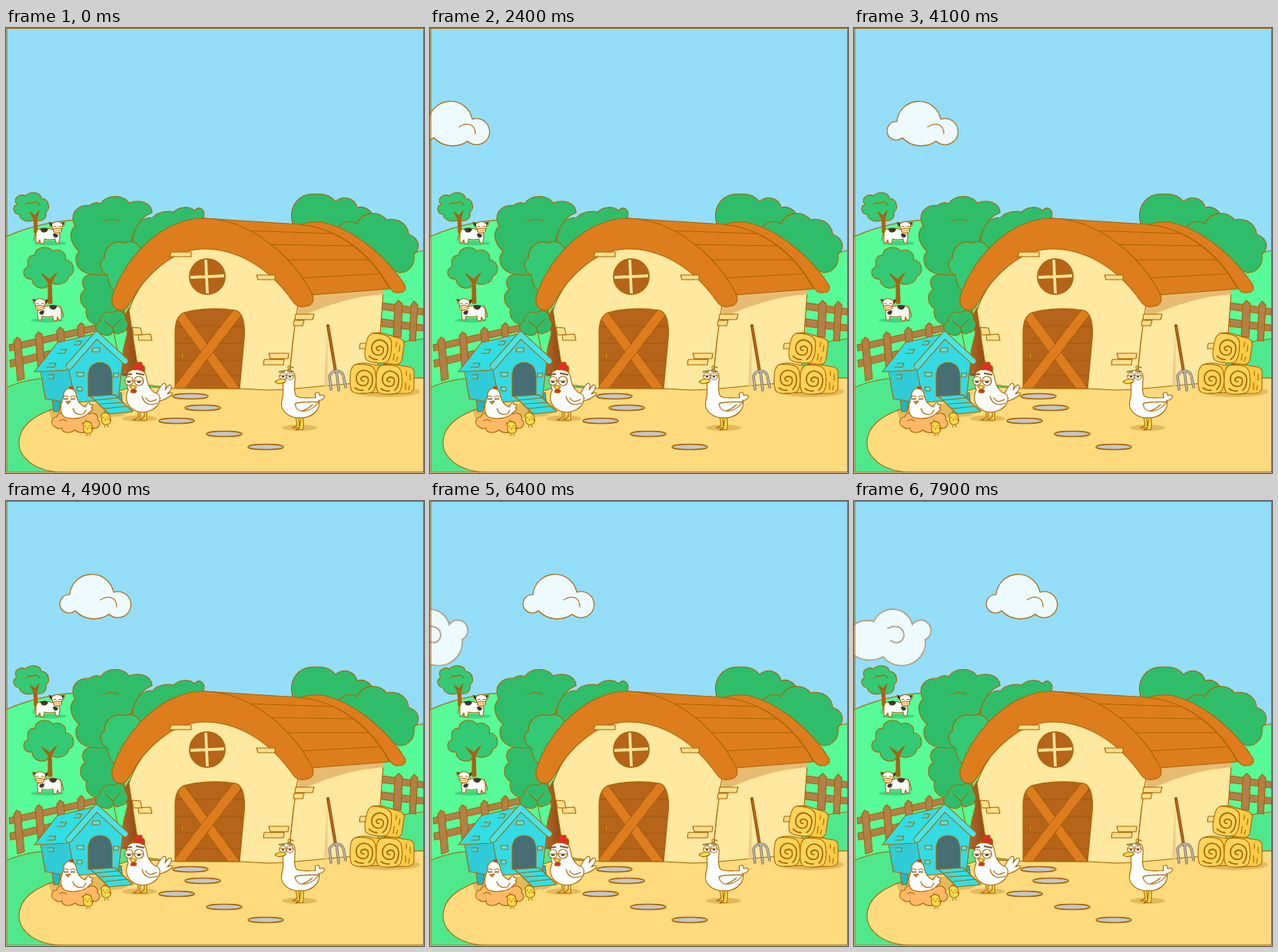
An HTML page without scripts for the animation above (8 s loop, 544 by 580 pixels).

```html
<!DOCTYPE html>
<html lang="en">
<head>
<meta charset="utf-8">
<title>Farm</title>
<style>
html, body { margin: 0; width: 100%; height: 100%; overflow: hidden; background: #94def9; }
svg { display: block; width: 100%; height: 100%; }
.line { stroke: #a86400; stroke-width: 1.1; stroke-linejoin: round; stroke-linecap: round; }
.none { fill: none; }
.leaf { fill: #30bd6a; }
.leaf2 { fill: #34c974; }
.trunk { fill: #a9601f; }
.fence { fill: #b28049; }
.roof { fill: #de7d1e; }
.wall { fill: #ffe8a0; }
.wood { fill: #b56419; }
.cyan { fill: #30dfe6; }
.white { fill: #fff; }
.gold { fill: #f9dd4c; }
.red { fill: #e42a22; }
.dark { fill: #40362c; }
.shade { fill: #965a00; opacity: .25; }
.drift { animation: drift 8s steps(80, end) infinite; }
@keyframes drift { from { transform: translateX(-268.6px); } to { transform: translateX(3.4px); } }
</style>
</head>
<body>
<svg viewBox="0 0 544 580" preserveAspectRatio="none">
<defs>
  <linearGradient id="bark" x1="0" y1="0" x2="1" y2="0">
    <stop offset="0" stop-color="#b8692a"/><stop offset="1" stop-color="#84420f"/>
  </linearGradient>
  <clipPath id="door"><path d="M220 469V400Q219 373 235 370Q266 363 299 368Q311 372 310.500 400L304 470Z"/></clipPath>

  <g id="cow">
    <ellipse class="shade" cx="58" cy="280.500" rx="21" ry="3" style="fill:#006030"/>
    <path class="line white" d="M41 263Q38 266 36 277M40 263Q50 259 62 263Q71 266 70 272L69 280H65L64 275Q57 277 50 275L49 281H45L44 276L42 280H39V268Z"/>
    <path class="dark" d="M44 262Q51 259 55 262Q53 268 47 266ZM61 268Q66 267 68 271Q65 275 62 272Z"/>
    <path class="line white" d="M60 255L56 253Q57 258 60 259L62 264Q67 268 72 264L73 259Q77 257 76 253L72 254Q66 250 60 255Z"/>
    <path class="dark" d="M60 255L56 253Q57 258 60 259ZM72 254L76 253L74 258Z"/>
    <ellipse class="line" cx="67" cy="264" rx="5.500" ry="3.200" fill="#ffd3a2"/>
    <path class="line none" d="M62 258.500H65M69 258.500H72M65 264H65.200M69 264H69.200"/>
  </g>

  <g id="bale" class="line">
    <path fill="#ffcb47" d="M7 2Q17-2 28 1L45 4Q51 6 50 13V31Q49 37 43 38L15 39Z"/>
    <path fill="#ffd45c" d="M7 2Q18 0 27 3Q34 6 34 15Q36 27 32 35Q28 40 17 39Q6 40 3 36Q0 30 1 17Q1 5 7 2Z"/>
    <path class="none" style="stroke-width:1.700" d="M19 23Q14 23 15 19Q20 15 24 19Q26 27 20 29Q11 30 9 22Q8 11 18 9Q30 10 30 21Q30 30 25 34M7 32Q12 36 18 35"/>
    <path class="none" d="M40 9V15M39 24V33M45 13V21M44 28L43 34"/>
  </g>

  <g id="chick">
    <path class="line gold" d="M101 520Q99 514 104 513Q110 512 111 517Q114 521 112 526Q109 530 104 528Q100 526 101 520Z"/>
    <path class="line none" d="M105 513L104 511M103 519H104M108 519H109M105 530V531.500M109 530V531.500M110 521L113 523"/>
    <path d="M104 521H108L106 524Z" fill="#f28b20"/>
  </g>
  <ellipse id="stone" class="line" rx="23" ry="3.600" fill="#c5c7ce" style="stroke-width:1.500"/>
</defs>

<path d="M0 0H544V580H0Z" fill="#94def9"/>

<g class="drift">
  <path class="line" fill="#edfaff" d="M185 122A28.800 28.800 0 0 1 242 119A17 17 0 1 1 236 147.500A34 34 0 0 1 192 143A12 12 0 1 1 185 122Z"/>
  <path class="line none" d="M225 129C235 122 246 125 246 138"/>
</g>
<g class="drift" fill="#edfaff" stroke="#b3a381" stroke-width="1.800" stroke-linecap="round">
  <path d="M26 157A26.500 26.500 0 0 1 76 161A13.300 13.300 0 1 1 93 180.400A31 31 0 0 1 38 203A34 30 0 0 1-6 196A19 19 0 0 1-1 162Q10 153 26 157Z"/>
  <path fill="none" d="M44 166C54 160 64 165 65 174C65 183 56 188 48 182"/>
</g>

<!-- hills -->
<path class="line" fill="#57fc98" d="M0 272Q42 253 92 250L260 330L470 312Q510 296 544 290V470H0Z"/>
<path class="line" fill="#50e88d" d="M0 469Q25 457 60 456L200 450L480 418Q515 408 544 405V580H0Z"/>

<!-- small trees -->
<path class="line leaf2" d="M17 243C9 243 8 232 14 230C8 222 18 215 25 219C31 212 45 214 46 222C56 222 58 236 52 240C54 250 43 254 38 249C30 255 18 251 17 243Z"/>
<path class="line trunk" d="M37 267L36 248L31 240L38 245L43 238L40 249L41 267Z"/>
<path class="line none" d="M25 231Q29 226 33 229Q40 224 44 231"/>
<path class="line leaf2" d="M34 327C22 329 19 314 29 311C26 299 33 295 37 297C39 283 57 284 61 291C70 286 80 294 77 302C90 303 91 321 82 323C80 335 64 336 60 332L56 335C48 343 34 338 34 327Z"/>
<path class="line trunk" d="M55 359L55 332L47 321L57 328L66 319L59 332L60 359Z"/>
<use href="#cow"/>
<use href="#cow" transform="translate(111 100.500) scale(-1 1)"/>

<!-- fences -->
<g class="line fence">
  <path d="M4 413L120 386L121 394L5 421ZM5 433L80 415L81 423L6 442Z"/>
  <path d="M10 408L14 403L19 406L24 457L15 460ZM38 401L42 396L47 399L51 444L42 448ZM66 395L70 390L75 393L77 415L68 420ZM93 389L98 384L102 388V404H94Z"/>
  <path d="M489 358L543 366V374L489 367ZM489 379L543 387V395L489 389Z"/>
  <path d="M504 402L506 360L511 355L516 360L514 403ZM525 407L527 361L531 356L536 361L533 408Z"/>
</g>

<!-- woods -->
<path class="line leaf" d="M373 255C367 233 381 214 404 216.500C416 215 425 221 429 226C439 217 454 222 457 234C468 231 477 239 480 250L460 290H390Z"/>
<path class="line leaf" d="M431 263C438 250 451 251 457 255C464 238 487 238 495 250C508 247 523 254 524 269C537 273 541 286 531 295C533 309 524 319 512 319L470 300Z"/>
<path class="line leaf" d="M166 268C168 255 177 247 191 247C197 239 212 238 218 240C226 232 240 232 245 238C253 230 260 238 257 247L230 300H160Z"/>
<path class="line leaf" d="M106 320C91 315 87 300 95 291C82 279 82 265 90 258C82 244 91 230 109 231C115 226 121 228 123 229C131 216 154 217 160 228C176 222 190 229 190 241Q174 246 165 270L150 330Z"/>
<path class="line none" d="M127 252Q136 247 147 252"/>
<path class="line leaf" d="M105 366C94 359 95 346 103 341C94 328 104 318 119 322L150 320L156 390L120 387C108 385 102 376 105 366Z"/>
<path class="line leaf2" d="M132 322C121 317 121 303 128 300C128 282 144 276 154 280C162 276 171 280 174 286L190 300L150 350Q133 340 132 322Z"/>
<path class="line" fill="url(#bark)" d="M160 365L154 376L158 398L153 418L148 452L177 458L174 420L168 375Z"/>
<path class="line leaf" d="M125 399C115 398 114 386 122 383C122 373 132 368 139 371C147 365 156 370 155 379C162 386 158 396 149 397Q143 401 140 395Q135 404 125 399Z"/>
<path class="line none" d="M129 382L139 391L149 380M139 391L145 420"/>

<!-- yard -->
<path class="line" fill="#ffdb7d" d="M70 579C34 577 16 557 17 540C18 517 38 500 90 489L165 468L360 470L450 457L544 456V579Z"/>

<!-- barn -->
<path class="line wall" d="M380 345L492 330L487 397L482 462L441 464L366 471L370 440Z"/>
<path d="M381 349L492 338V347Q440 350 380 378Z" fill="#e8bb72"/>
<path class="line wall" d="M160 368C178 316 220 285 258 285C312 286 352 325 380 360L373 410L367 471L342 472L304 470H222L175 464L168 420Z"/>
<path class="line roof" d="M258 248L383 256C438 262 478 300 499 340L396 348Z"/>
<path class="line none" d="M310 264L424 268M334 282L452 284M358 302L474 302M380 326L492 320"/>
<path class="line roof" d="M383 256Q396 252 410 253C450 260 494 296 519 335Q522 345 511 345Q504 346 499 338C475 295 436 262 383 256Z"/>
<path class="line roof" d="M139 348C154 301 202 248 258 248C326 250 378 306 399 348Q403 361 389 363Q379 365 373 356C343 313 302 288 258 288C218 288 181 321 161 359Q155 371 145 367Q135 362 139 348Z"/>
<g class="line" fill="#ffdf8b">
  <path d="M215 292H241V298H213ZM326 322H350V328H328ZM342 424H368L367 431H344ZM336 432H362L361 439H335ZM377 373H401L399 380H376ZM375 381H388L386 388H374ZM164 390L175 391L177 400H166ZM172 400L188 399L190 407H173ZM461 411H470L469 418H460Z"/>
</g>
<circle class="line wood" cx="262" cy="324" r="23.300"/>
<path d="M260 301L262 347M239 325L285 323" stroke="#a86400" stroke-width="5.600"/>
<path d="M260 302L262 346M240 325L284 323" stroke="#ffe29a" stroke-width="3.800"/>
<g clip-path="url(#door)">
  <path class="wood" d="M215 360H315V475H215Z"/>
  <path d="M220 389H310M220 411H310M220 433H310M220 453H310" stroke="#a0560f" stroke-width="1"/>
  <g fill="none" stroke="#a05a08" stroke-width="13.500">
    <path id="plank" d="M222 368L304 480"/>
    <path d="M222 368L304 480" stroke="#de7d1e" stroke-width="11.800"/>
    <path d="M308 362L220 476"/>
    <path d="M308 362L220 476" stroke="#de7d1e" stroke-width="11.800"/>
  </g>
</g>
<path class="line none" d="M220 469V400Q219 373 235 370Q266 363 299 368Q311 372 310.500 400L304 470Z"/>
<rect class="line gold" x="228.500" y="423" width="1.600" height="8" rx=".8"/>

<!-- tools and hay -->
<path d="M418 390L414 467H419Z" fill="#e7c27c" opacity=".7"/>
<path d="M419 388L429 448" stroke="#8e4d09" stroke-width="4" stroke-linecap="round"/>
<path d="M419.500 389L429 447" stroke="#b96a20" stroke-width="2"/>
<g fill="none" stroke-linecap="round">
  <path d="M423 471L421 454Q424 447 430 447Q437 447 439 453L442 468M430 447L433 472" stroke="#806c58" stroke-width="3.400"/>
  <path d="M423 471L421 454Q424 447 430 447Q437 447 439 453L442 468M430 447L433 472" stroke="#c9cbd0" stroke-width="1.400"/>
</g>
<ellipse class="shade" cx="496" cy="474" rx="43" ry="7"/>
<use href="#bale" transform="translate(447 437)"/>
<use href="#bale" transform="translate(481 438)"/>
<use href="#bale" transform="translate(470 395) rotate(8)"/>

<use href="#stone" x="240" y="480"/>
<use href="#stone" x="256" y="495"/>
<use href="#stone" x="222" y="512"/>
<use href="#stone" x="284" y="529"/>
<use href="#stone" x="338" y="546"/>

<!-- coop -->
<path class="shade" d="M55 497L140 487L168 498L150 506L60 512Z"/>
<g class="line">
  <path fill="#25b4c6" d="M60 483L62 500H69L71 483ZM142 478L146 495L152 493L150 475Z"/>
  <path fill="#2fcbd6" d="M45 447L51 483L91 490L84 440Z"/>
  <path fill="#36dae3" d="M118 402L82 445L90 488L146 484L152 434Z"/>
  <path class="cyan" d="M67 410L118 398L79 446L37 448Z"/>
  <path class="cyan" d="M56 437H65L63 442H53M70 419H79L76 424H67M91 408H99L96 413H88M55 452H62V457H56"/>
  <path fill="#486e73" d="M107 480V451Q109 436 123 436Q137 437 138 454V479Z"/>
  <path fill="#55e9ec" d="M92 449H101V454H93ZM140 450H147L146 455H140ZM113 417H122V422H112ZM92 468H99V473H93Z"/>
</g>
<g fill="none" stroke-linejoin="round" stroke-linecap="round">
  <path d="M82 441L118 400L155 434" stroke="#a86400" stroke-width="9"/>
  <path d="M82 441L118 400L155 434" stroke="#45e5eb" stroke-width="7"/>
</g>
<path class="line cyan" d="M110 480L142 478L165 500L134 503Z"/>
<path class="line none" d="M116 485L146 482M122 490L152 488M128 496L158 493"/>

<!-- hen on the nest -->
<path class="line" fill="#ffb967" d="M64 520C57 518 59 506 66 507C68 500 77 500 80 503H108C115 499 121 506 119 510C126 516 119 524 112 521C106 530 94 528 90 524C82 530 72 527 73 521Q68 524 64 520Z"/>
<path class="line none" d="M70 512Q75 508 79 513M99 516Q105 511 111 515"/>
<path class="line white" d="M75 480C74 468 88 466 91 476C92 485 95 491 103 494L106 489Q110 487 109 491Q115 490 111 495Q115 498 109 500C103 509 86 511 76 507C69 501 71 491 75 480Z"/>
<path class="line none" d="M87 496Q90 506 101 503L104 498M75 481Q78 478 81 481M84 481Q87 478 90 481"/>
<path d="M75 483.500H81M84 483.500H90" stroke="#765a31" stroke-width="1.600"/>
<path class="line red" d="M83 470Q82 466 85 468Q87 465 88 471Z"/>
<path class="line" fill="#f4a83a" d="M78 487L84 486L81 490Z"/>

<!-- rooster -->
<ellipse class="shade" cx="174" cy="509" rx="23" ry="4"/>
<path class="line gold" d="M172 498V508L165 511H174L175 498ZM180 498V507L175 511H183L183 498Z"/>
<path class="line white" d="M193 481C198 472 202 464 206 463Q210 464 207 472Q212 463 215 466Q217 470 210 477Q218 473 216 478Q209 484 200 486Z"/>
<path class="line red" d="M165 448Q162 441 168 442Q168 434 173 436Q178 434 177 440Q182 439 180 449Z"/>
<path class="line white" d="M158 450C163 443 179 444 182 452C184 463 186 470 193 475Q202 477 200 486C197 497 182 504 169 499C157 494 154 483 159 472Q155 459 158 450Z"/>
<path class="line none" d="M177 480Q181 495 197 489M182 482Q186 490 196 484"/>
<g class="line white">
  <circle cx="160" cy="460" r="5.500"/><circle cx="173" cy="460" r="6"/>
  <path d="M154.500 460H165.500M167 460H179"/>
</g>
<path d="M153 452L164 451M169 450L180 452" stroke="#765a31" stroke-width="2"/>
<path class="dark" d="M158 460.500H162V462.500H158ZM171 460.500H175V462.500H171Z"/>
<path class="line gold" d="M161 467Q165 464 170 468L165 472Z"/>
<path class="line red" d="M163 472Q168 469 170 473Q168 477 165 475Q161 476 163 472Z"/>

<use href="#chick"/>
<use href="#chick" transform="translate(23.500 -11.500)"/>

<!-- goose -->
<ellipse class="shade" cx="382" cy="521" rx="23" ry="4"/>
<path class="line gold" d="M377 507L379 518L373 521H382L381 507ZM384 507L382 521L377 524L387 523L387 507Z"/>
<path class="line none" d="M368 445Q365 440 370 441M370 445Q371 440 374 443"/>
<path class="line white" d="M359 453C361 443 374 443 376 453C377 463 373 473 378 480C388 484 397 481 403 482Q401 475 405 475Q408 474 408 479Q416 477 414 482Q411 486 407 485C410 497 399 508 384 508C367 509 356 498 359 486C362 475 361 464 359 453Z"/>
<path class="line none" d="M376 490C381 486 398 488 408 487M376 490Q378 501 390 499Q401 497 407 487M386 499Q395 495 399 491"/>
<path class="line white" d="M356 454A4.500 4.500 0 0 1 365 454A4.500 4.500 0 0 1 356 454ZM365 454A4.500 4.500 0 0 1 374 454A4.500 4.500 0 0 1 365 454Z"/>
<path class="line none" d="M356 453H374"/>
<path class="dark" d="M359 453.500H362V455.500H359ZM368 453.500H371V455.500H368Z"/>
<path d="M355 448L363 447M366 447L374 448" stroke="#765a31" stroke-width="1.600"/>
<path class="line gold" d="M350 461Q356 456 364 458Q365 462 359 463Q353 465 350 461Z"/>

<path d="M.5 272V579.500H544" fill="none" stroke="#fff"/>
<path d="M1 .5H543.500V579H1Z" class="line none"/>
</svg>
</body>
</html>
```
